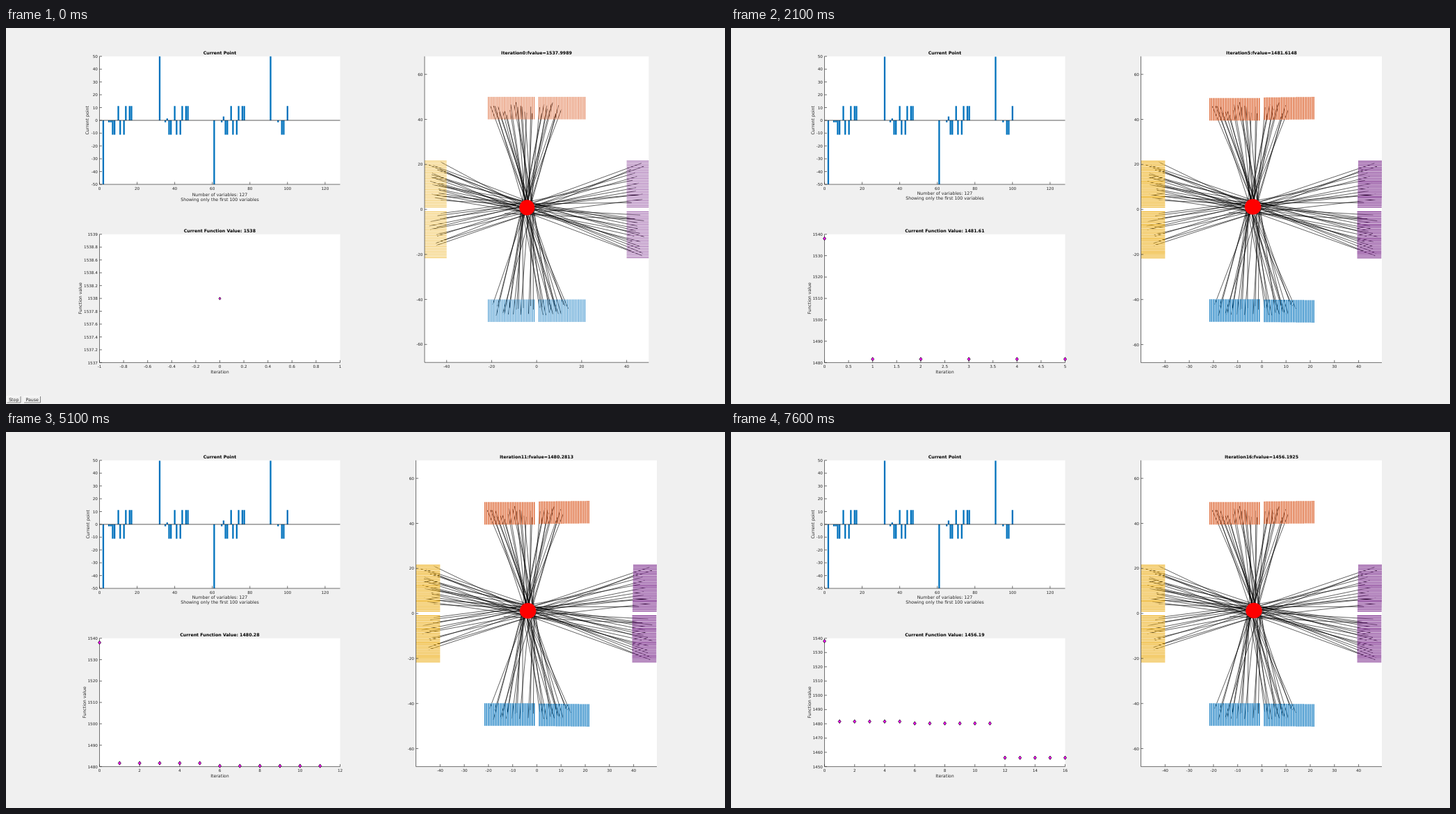
An HTML page for the animation above (8 s loop, 1034 px wide and 541 px high).

```html
<!DOCTYPE html>
<html lang="en">
<head>
<meta charset="utf-8">
<title>Optimisation plots</title>
<style>
  html, body { margin: 0; width: 100%; height: 100%; overflow: hidden; background: #f0f0f0; }
  svg { display: block; width: 1034px; height: 541px; }
  text { font: 5.68px "DejaVu Sans", sans-serif; fill: #262626; text-rendering: geometricPrecision; }
  .label { font-size: 6.25px; }
  .title { font-size: 6.25px; font-weight: bold; fill: #000; }
</style>
</head>
<body>
<svg id="stage" viewBox="0 0 1034 541"></svg>
<script>
const LOOP = 8000, FIRST = 100, STEP = 500, LAST = 16;
const GROUP = 30, SHOWN = 100;
const stage = document.getElementById('stage');

// Objective value at an iteration
function value(n) {
  if (n === 0) return 1537.9989;
  if (n === 1) return 1481.6156;
  if (n < 6) return 1481.6148;
  if (n < 11) return 1480.2901;
  if (n === 11) return 1480.2813;
  return n === 12 ? 1456.1936 : 1456.1925;
}

// The variables repeat the same pattern in every group
function makeBars() {
  const bars = [];
  for (let k = 0; k < 4; k++) {
    const base = k * GROUP;
    bars.push([Math.round(2 + 29.67 * k), k % 2 ? 50 : -50], [base + 5, -1.5]);
    if (k < 3) bars.push([base + 6, k ? 1.5 * k : -1.5]);
    for (const i of [7, 8, 11, 13]) bars.push([base + i, -11.2]);
    for (const i of [10, 14, 16, 17]) bars.push([base + i, 11.2]);
  }
  return bars.filter(([x]) => x <= SHOWN);
}

// place(p, d) turns position along a side and depth into x, y;
// each span is: from, to, number of spokes
const sides = [
  { color: '#0072bd', place: (p, d) => [p, -d], spans: [[-19.5, -1.5, 15], [1.2, 14, 14]],
    tilt: p => p > 0 ? 0.012 * p : -0.12 },
  { color: '#d95319', place: (p, d) => [p, d], spans: [[-20.5, -2, 19], [1.3, 11, 11]],
    tilt: p => p > 0 ? -0.25 + 0.012 * p : -0.5 },
  { color: '#edb120', place: (p, d) => [-d, p], spans: [[4, 21, 20], [-16, -1.8, 12]],
    tilt: () => 0 },
  { color: '#7e2f8e', place: (p, d) => [d, p], spans: [[3, 20.5, 13], [-20.5, -2.5, 17]],
    tilt: p => p > 0 ? -0.5 + 0.015 * p : -0.6 }
];

function random(seed) {
  return () => {
    seed = (seed * 16807) % 2147483647;
    return seed / 2147483647;
  };
}

const fix = v => v.toFixed(2);
const range = (a, b, step) => Array.from({ length: Math.round((b - a) / step) + 1 }, (_, i) => +(a + i * step).toFixed(2));
const text = (x, y, s, anchor = 'middle', cls = '', extra = '') =>
  `<text x="${fix(x)}" y="${fix(y)}" text-anchor="${anchor}" class="${cls}" ${extra}>${s}</text>`;
const title = (x, y, s) => text(x, y + 2.3, s, 'middle', 'title');
const label = (x, y, s) => text(x, y + 2.2, s, 'middle', 'label');
const sideLabel = (x, y, s) => text(x, y, s, 'middle', 'label', `transform="rotate(-90 ${x} ${y})"`);
const path = (d, color, width) => `<path d="${d}" fill="none" stroke="${color}" stroke-width="${width}"/>`;
const segment = (a, b) => `M${fix(a[0])} ${fix(a[1])}L${fix(b[0])} ${fix(b[1])}`;

// box: left, top, right, bottom; xl and yl: data limits
function makeAxes(box, xl, yl, xTicks, yTicks) {
  const [l, t, r, b] = box;
  const X = v => l + (v - xl[0]) / (xl[1] - xl[0]) * (r - l);
  const Y = v => b - (v - yl[0]) / (yl[1] - yl[0]) * (b - t);
  let d = `M${l} ${t}V${b}H${r}`, names = '';
  for (const v of xTicks) {
    d += `M${fix(X(v))} ${b}v-3.5`;
    names += text(X(v), b + 7.8, v);
  }
  for (const v of yTicks) {
    d += `M${l} ${fix(Y(v))}h3.5`;
    names += text(l - 2.6, Y(v) + 2.1, v, 'end');
  }
  return {
    X, Y,
    at: p => [X(p[0]), Y(p[1])],
    back: `<rect x="${l}" y="${t}" width="${r - l}" height="${b - t}" fill="#fff"/>`,
    front: path(d, '#262626', 0.65) + names
  };
}

function barPlot(n) {
  const ax = makeAxes([134.5, 40.8, 480.5, 225], [0, 128], [-50, 50], range(0, 120, 20), range(-50, 50, 10));
  let out = ax.back;
  for (const [x, v] of makeBars()) {
    const tip = n && v === 50 ? 49.7 : v;
    const top = ax.Y(Math.max(tip, 0)), low = ax.Y(Math.min(tip, 0));
    out += `<rect x="${fix(ax.X(x) - 1.15)}" y="${fix(top)}" width="2.3" height="${fix(low - top)}" fill="#0072bd"/>`;
  }
  out += path(segment(ax.at([0, 0]), ax.at([128, 0])), '#000', 0.65) + ax.front;
  const captionY = n ? 237.8 : 239.5;
  return out + title(307.4, 35.2, 'Current Point') +
    label(307.5, captionY, 'Number of variables: 127') +
    label(307.5, captionY + 7.4, 'Showing only the first 100 variables') +
    sideLabel(n ? 120 : 119, 132.8, 'Current point');
}

function iterationScale(n) {
  if (n === 0) return [-1, 1, 0.2];
  if (n < 3) return [0, n, n / 10];
  if (n < 6) return [0, n, 0.5];
  if (n < 11) return [0, n, 1];
  if (n === 15) return [0, n, 5];
  return [0, n + n % 2, 2];
}

function valuePlot(n) {
  const [x0, x1, step] = iterationScale(n);
  const [y0, y1, yStep] = n === 0 ? [1537, 1539, 0.2] : [n < 12 ? 1480 : 1450, 1540, 10];
  const ax = makeAxes([134.5, 296.8, 480.5, 481.4], [x0, x1], [y0, y1], range(x0, x1, step), range(y0, y1, yStep));
  const w = n ? 2 : 1.5, h = n ? 2.7 : 2;
  let marks = '';
  for (let i = 0; i <= n; i++) {
    marks += `M${fix(ax.X(i))} ${fix(ax.Y(value(i)) - h)}l${w} ${h}l${-w} ${h}l${-w} ${-h}z`;
  }
  return ax.back + ax.front +
    `<path d="${marks}" fill="#f0f" stroke="#000" stroke-width=".7"/>` +
    title(307.4, 291.8, 'Current Function Value: ' + Number(value(n).toPrecision(6))) +
    label(307.4, n ? 494.4 : 495, 'Iteration') +
    sideLabel(n ? 115.3 : 109, 389, 'Function value');
}

// Spokes run from inside the hub to evenly spread, jittered ends
function makeSpokes(ax, hub) {
  const rand = random(4711);
  let d = '';
  for (const { place, spans } of sides) {
    for (const [from, to, count] of spans) {
      for (let i = 0; i < count; i++) {
        const p = from + (to - from) * (i + (i % (count - 1) ? rand() - 0.5 : 0)) / (count - 1);
        const depth = 42 + 6 * rand(), angle = 2 * Math.PI * rand(), reach = 3 * Math.sqrt(rand());
        const inner = [hub[0] + reach * Math.cos(angle), hub[1] + reach * Math.sin(angle)];
        d += segment(ax.at(inner), ax.at(place(p, depth)));
      }
    }
  }
  return d + segment(ax.at([hub[0] - 10, hub[1] - 2.6]), ax.at([44, -4.4]));
}

function makeRods(ax, { place, tilt }, tilted) {
  let d = '';
  for (const sign of [-1, 1]) {
    for (let i = 0; i < GROUP; i++) {
      const p = sign * (1.05 + i * 20.4 / (GROUP - 1)), shift = tilted ? tilt(p) : 0;
      d += segment(ax.at(place(p, 40 + shift)), ax.at(place(p, 50 + shift)));
    }
  }
  return d;
}

function layoutPlot(n) {
  const box = n ? [589.5, 40.8, 936, 481.4] : [602, 40.8, 924.3, 481.2];
  const ax = makeAxes(box, n ? [-50, 49.6] : [-49.8, 49.8], [-68, 68], range(-40, 40, n ? 10 : 20), range(-60, 60, 20));
  const hub = n === 0 ? [-4.3, 0.8] : n < 12 ? [-3.7, 1.2] : [-3.3, 1.3];
  const rods = sides.map(side => path(makeRods(ax, side, n > 0), side.color, n ? 1.3 : 0.85)).join('');
  const [cx, cy] = ax.at(hub);
  return ax.back +
    `<clipPath id="area"><rect x="${box[0]}" y="${box[1]}" width="${box[2] - box[0]}" height="${box[3] - box[1]}"/></clipPath>` +
    `<g clip-path="url(#area)">${path(makeSpokes(ax, hub), '#000', 0.62)}${rods}` +
    `<ellipse cx="${fix(cx)}" cy="${fix(cy)}" rx="${n ? 11.8 : 11}" ry="11.2" fill="#f00"/></g>` +
    ax.front + title(763, 35.2, `Iteration${n}:fvalue=${value(n).toFixed(4)}`);
}

function button(x, w, s) {
  return `<rect x="${x}" y="530" width="${w}" height="9" fill="#f0f0f0" stroke="#fff" stroke-width=".8"/>` +
    path(`M${x} 539h${w}v-9`, '#777', 0.9) + label(x + w / 2, 534.5, s);
}

function draw(n) {
  stage.innerHTML = '<rect width="1034" height="541" fill="#f0f0f0"/>' +
    barPlot(n) + valuePlot(n) + layoutPlot(n) +
    (n ? '' : button(1.5, 19.5, 'Stop') + button(26, 23.5, 'Pause'));
}

let shown = -1;
function tick(now) {
  const t = now % LOOP;
  const n = t < FIRST ? 0 : Math.min(LAST, 1 + Math.floor((t - FIRST) / STEP));
  if (n !== shown) draw(shown = n);
  requestAnimationFrame(tick);
}
draw(shown = 0);
requestAnimationFrame(tick);
</script>
</body>
</html>
```
